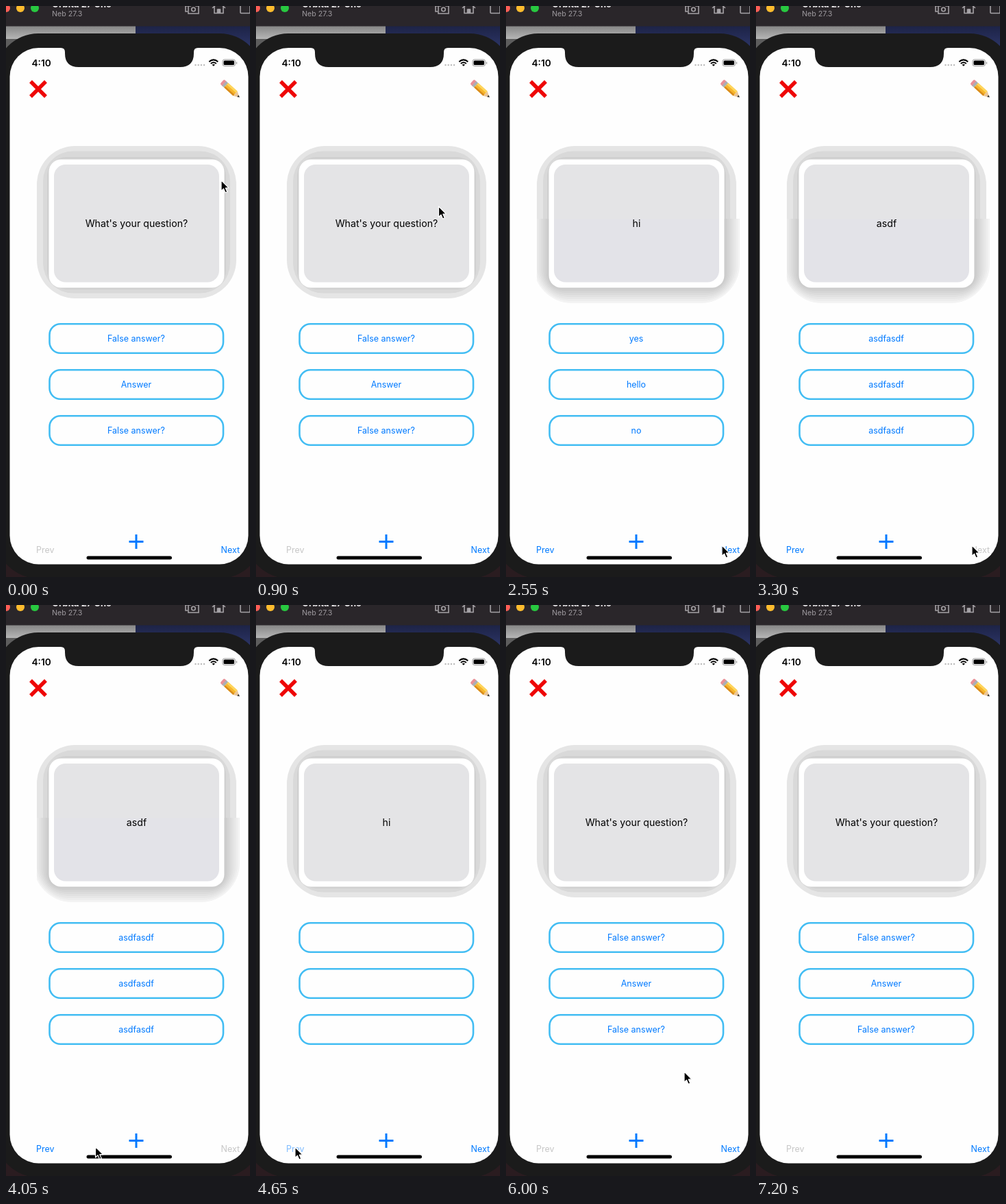
These frames come from a looping animation (356 px wide and 832 px high, 8 s). An HTML page:

```html
<!DOCTYPE html>
<html lang="en">
<head>
<meta charset="utf-8">
<title>Quiz editor</title>
<style>
  html, body { margin: 0; width: 100%; height: 100%; overflow: hidden; background: #1b1b1b; }
  svg { display: block; width: 100vw; height: 100vh; }
  text { font-family: Inter, Roboto, sans-serif; }
  .answer { font-size: 12.5px; fill: #007aff; text-anchor: middle; }
  .nav { font-size: 12.5px; }
  .icon { fill: none; stroke: #a5a2a6; stroke-width: 1.6; }
</style>
</head>
<body>
<svg viewBox="0 0 356 832">
  <defs>
    <linearGradient id="wall" x2="0" y2="1">
      <stop offset="0" stop-color="#858585"/><stop offset="1" stop-color="#b8b8b8"/>
    </linearGradient>
    <linearGradient id="sky" x2="0" y2="1">
      <stop offset="0" stop-color="#1d2346"/><stop offset="1" stop-color="#303a70"/>
    </linearGradient>
    <clipPath id="softClip"><rect id="softArea"/></clipPath>
  </defs>

  <!-- desktop and window bar -->
  <rect width="356" height="832" fill="#2a1c20"/>
  <rect y="29" width="189" height="20" fill="url(#wall)"/>
  <rect y="48" width="60" height="18" fill="#5d5d5d"/>
  <rect x="189" y="29" width="167" height="40" fill="url(#sky)"/>
  <rect width="356" height="29.5" fill="#2a262a"/>
  <circle cx="0" cy="3" r="6" fill="#ff5f57"/>
  <circle cx="21" cy="3" r="6" fill="#febc2e"/>
  <circle cx="42" cy="3" r="6" fill="#28c840"/>
  <text x="67" y="2" font-size="13" font-weight="700" fill="#e8e6e8">Orbita 27 Uno</text>
  <text x="67" y="15" font-size="10.7" fill="#9d999e">Neb 27.3</text>
  <g class="icon">
    <path d="M265 0H262V8H265M266 0V11H281V0H277L275-2H271L269 0Z"/>
    <circle cx="273.500" cy="5" r="2.800"/>
    <path d="M301 3L310.500-5L320 3M304 1V10.500H317V1M310.500 10V4" />
    <path d="M308.500 10V5H312.500V10" fill="#a5a2a6"/>
    <rect x="342" y="-3" width="14" height="13.500" rx="1"/>
  </g>

  <!-- phone -->
  <rect x="-15" y="40" width="389" height="794" rx="62" fill="#1b1b1b"/>
  <rect x="5.500" y="61" width="348" height="752.500" rx="42" fill="#fefefe"/>
  <path d="M80 60V61Q86 61 86 67V69Q86 89 106 89H254Q274 89 274 69V67Q274 61 280 61V60Z" fill="#1b1b1b"/>
  <text x="37.500" y="87.500" font-size="13.700" font-weight="600">4:10</text>
  <path d="M276.500 86H290" stroke="#bcbcbc" stroke-width="2.400" stroke-linecap="round" stroke-dasharray="0 4.200"/>
  <g fill="none" stroke="#000" stroke-width="2">
    <path d="M296.300 81.200Q302.800 75.500 309.300 81.200M298.800 84Q302.800 80.600 306.800 84"/>
    <path d="M302.800 87.800L300.600 85.500Q302.800 84 305 85.500Z" fill="#000" stroke="none"/>
    <rect x="316" y="78" width="18.500" height="9.500" rx="2.800" stroke="#999" stroke-width="1"/>
    <rect x="317.500" y="79.500" width="15.500" height="6.500" rx="1.500" fill="#000" stroke="none"/>
    <path d="M336.500 81.500V84.500" stroke="#999" stroke-width="1.200"/>
  </g>
  <path d="M36 110L58 132M58 110L36 132" stroke="#ee0505" stroke-width="5.500"/>
  <g transform="translate(314.500 109.500) rotate(42)">
    <rect x="1" y="-4.500" width="6" height="9" rx="2" fill="#e98f96"/>
    <rect x="5" y="-4.500" width="4" height="9" fill="#a9b0b5"/>
    <rect x="9" y="-4.500" width="18" height="9" fill="#f7b52c"/>
    <rect x="9" y="-4.500" width="18" height="3" fill="#ffd65c"/>
    <rect x="9" y="2" width="18" height="2.500" fill="#d88b1c"/>
    <path d="M27-4.500L35 0L27 4.500Z" fill="#eac597"/>
    <path d="M32-1.700L35.500 0L32 1.700Z" fill="#333"/>
  </g>

  <g id="card"></g>
  <g id="softCard" clip-path="url(#softClip)"></g>
  <text id="question" x="190.500" y="322" font-size="14.200" text-anchor="middle"></text>
  <g id="answers"></g>

  <text id="prev" class="nav" x="44" y="797">Prev</text>
  <text id="next" class="nav" x="313.500" y="797">Next</text>
  <path d="M179.500 780.500H200.500M190 770V791" stroke="#007aff" stroke-width="3"/>
  <rect x="117.500" y="801.500" width="124.500" height="5" rx="2.500"/>
  <path id="cursor" d="M0 0V15.500L3.500 12.200L6 18L8.800 16.800L6.300 11.200H11Z"
        stroke="#fff" stroke-width="1.200" stroke-linejoin="round"/>
</svg>

<script>
const LOOP = 8000, STEP = 150;
const $ = id => document.getElementById(id);

function add(parent, tag, attrs) {
  const el = document.createElementNS('http://www.w3.org/2000/svg', tag);
  for (const key in attrs) el.setAttribute(key, attrs[key]);
  return parent.appendChild(el);
}

// Rounded box given by its edges
const box = (parent, left, top, right, bottom, rx, fill) =>
  add(parent, 'rect', { x: left, y: top, width: right - left, height: bottom - top, rx, fill });

function drawFace(parent, panel) {
  box(parent, 62.5, 223.5, 318.5, 410.5, 18, '#fff');
  box(parent, 70, 231, 311, 402.5, 17, panel);
}

box($('card'), 45, 204, 336, 426, 56, '#e5e5e5');
box($('card'), 54, 211.5, 327, 418.5, 44, '#d9d9d9');
box($('card'), 60, 220, 321, 413, 28, '#d0d0d0');
drawFace($('card'), '#e4e4e6');

// Finer shadow bands, shown in part of the card only
for (let i = 0; i < 8; i++) {
  const grow = 23 - i * 3, shade = 243 - i * 6;
  box($('softCard'), 62.5 - grow, 223.5 - grow, 318 + grow, 410 + grow,
      18 + grow * 1.7, `rgb(${shade},${shade},${shade})`);
}
drawFace($('softCard'), '#e3e3e8');

const labels = [462, 529, 596].map(y => {
  add($('answers'), 'rect', { x: 63.5, y: y + 1.2, width: 253.5, height: 42.6, rx: 16,
    fill: '#fefefe', stroke: '#43bdf3', 'stroke-width': 2.6 });
  return add($('answers'), 'text', { class: 'answer', x: 190, y: y + 27 });
});

const cards = [
  { question: "What's your question?", answers: ['False answer?', 'Answer', 'False answer?'] },
  { question: 'hi', answers: ['yes', 'hello', 'no'] },
  { question: 'asdf', answers: ['asdfasdf', 'asdfasdf', 'asdfasdf'] }
];

const looks = {
  on: ['#007aff', 1], press: ['#007aff', 0.5], off: ['#c7c7c7', 1], fade: ['#c7c7c7', 0.5]
};
const areas = {
  none: [0, 0, 0, 0], trail: [229, 255, 73, 178], half: [45, 310, 296, 123], left: [45, 310, 221, 123]
};

// time, question, answers, answer opacity, prev, next, soft area
const states = [
  [0, 0, 0, 1, 'off', 'on', 'none'],
  [1050, 0, 0, 1, 'off', 'on', 'trail'],
  [2100, 0, 0, 1, 'off', 'press', 'trail'],
  [2250, 1, 0, 0.1, 'fade', 'press', 'half'],
  [2400, 1, 1, 0.5, 'on', 'on', 'half'],
  [2550, 1, 1, 1, 'on', 'on', 'half'],
  [2850, 1, 1, 1, 'on', 'press', 'half'],
  [3000, 2, 1, 0.1, 'on', 'fade', 'half'],
  [3150, 2, 2, 0.5, 'on', 'off', 'half'],
  [3300, 2, 2, 1, 'on', 'off', 'half'],
  [4500, 2, 2, 1, 'press', 'off', 'none'],
  [4650, 1, 2, 0, 'press', 'on', 'none'],
  [4800, 1, 1, 0.5, 'on', 'on', 'none'],
  [4950, 1, 1, 1, 'on', 'on', 'none'],
  [5250, 1, 1, 1, 'press', 'on', 'left'],
  [5400, 0, 1, 0.1, 'fade', 'on', 'left'],
  [5550, 0, 0, 0.5, 'off', 'on', 'left'],
  [5700, 0, 0, 1, 'off', 'on', 'none']
];

// time, x, y
const path = [
  [450, 314, 254], [750, 297, 184], [1050, 236, 400], [1200, 232, 560], [1500, 270, 753],
  [1800, 312, 784], [1950, 315, 786], [3600, 315, 786], [3900, 215, 786], [4200, 46, 793],
  [4350, 57, 790], [5400, 57, 790], [5700, 183, 553], [6000, 260, 680], [6300, 318, 790]
];
const CURSOR_END = 6900;

function cursorAt(t) {
  const i = path.findIndex(point => point[0] > t);
  if (i === 0) return path[0].slice(1);
  if (i < 0) return path[path.length - 1].slice(1);
  const [a, b] = [path[i - 1], path[i]];
  const k = (t - a[0]) / (b[0] - a[0]);
  return [1, 2].map(n => a[n] + (b[n] - a[n]) * k);
}

function paint(el, look) {
  const [color, opacity] = looks[look];
  el.setAttribute('fill', color);
  el.setAttribute('opacity', opacity);
}

function render(t) {
  const [, question, answers, alpha, prev, next, soft] = states.filter(s => s[0] <= t).pop();
  $('question').textContent = cards[question].question;
  labels.forEach((label, i) => {
    label.textContent = cards[answers].answers[i];
    label.setAttribute('opacity', alpha);
  });
  paint($('prev'), prev);
  paint($('next'), next);
  ['x', 'y', 'width', 'height'].forEach((key, i) => $('softArea').setAttribute(key, areas[soft][i]));
  $('cursor').setAttribute('transform', `translate(${cursorAt(t)})`);
  $('cursor').setAttribute('visibility', t < CURSOR_END ? 'visible' : 'hidden');
}

function tick() {
  const t = performance.now() % LOOP;
  render(Math.floor(t / STEP) * STEP);
  requestAnimationFrame(tick);
}
tick();
</script>
</body>
</html>
```
